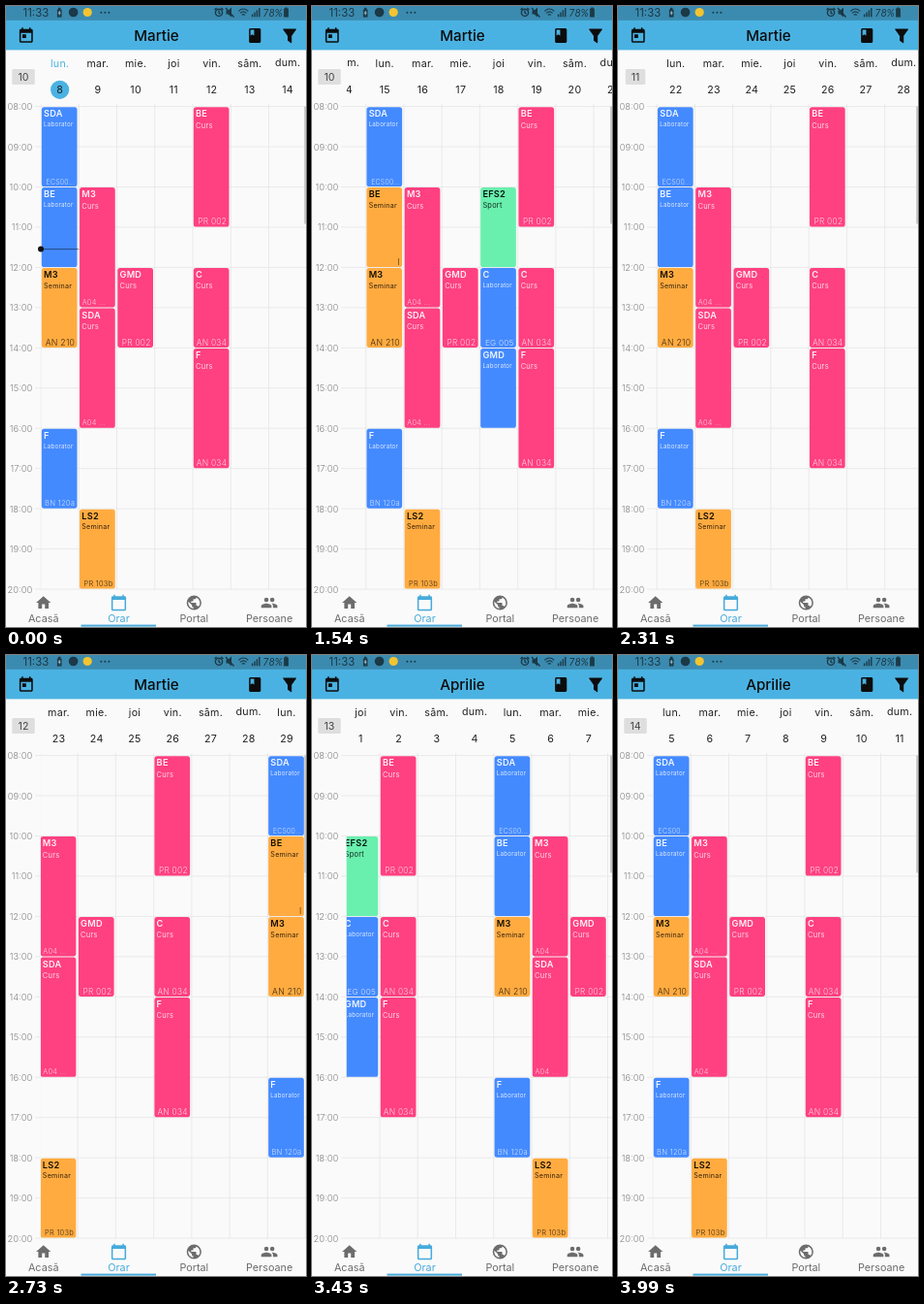
Write an HTML page that moves like this. It is 310x640 px and loops after 4.2 s.

```html
<!DOCTYPE html>
<html lang="ro">
<head>
<meta charset="utf-8">
<title>Orar</title>
<style>
  html, body { margin: 0; width: 100%; height: 100%; overflow: hidden; background: #fafafa; }
  svg { display: block; width: 100%; height: 100%; font-family: Inter, "Open Sans", sans-serif; }
  #days { letter-spacing: .25px; }
</style>
</head>
<body>
<svg id="stage" viewBox="0 0 310 640" xmlns="http://www.w3.org/2000/svg">
  <defs>
    <clipPath id="view"><rect x="35.7" y="45" width="274.3" height="556.5"/></clipPath>
  </defs>
  <rect width="310" height="640" fill="#fafafa"/>
  <g id="hours"></g>
  <g clip-path="url(#view)"><g id="days"></g></g>
  <g id="now">
    <line y1="250.6" y2="250.6" stroke="#000" stroke-opacity=".6" stroke-width=".8"/>
    <circle cy="250.6" fill="#111"/>
  </g>
  <rect x="308.2" y="103.5" width="1.8" height="121" fill="#c4c4c4"/>
  <rect id="weekBox" y="65" height="16" rx="1.5" fill="#dedede"/>
  <text id="week" x="18" y="77" font-size="10.6" fill="#444" text-anchor="middle"></text>

  <rect width="310" height="45.4" fill="#4ab2e2"/>
  <rect width="310" height="14.8" fill="#3b8bb0"/>
  <text id="month" x="155.5" y="35.8" font-size="15.2" font-weight="500" fill="#0c0c0c" text-anchor="middle"></text>
  <g id="status" fill="#1b3947">
    <text x="17.6" y="10.5" font-size="11.4">11:33</text>
    <path d="M54 1.8h2.4v1.6h1.1v8h-4.6v-8h1.1z"/>
    <path d="M55.2 5v4.4M53.8 7.2h2.8" stroke="#b9dbe8" stroke-width=".8"/>
    <circle cx="69.6" cy="6.5" r="4.8"/>
    <circle cx="84.2" cy="6.5" r="4.6" fill="#f4c430"/>
    <circle cx="98.4" cy="6.8" r="1"/><circle cx="102.4" cy="6.8" r="1"/><circle cx="106.4" cy="6.8" r="1"/>
    <path d="M227.5 4.6h2.2l3.3-3v10l-3.3-3h-2.2z"/>
    <g fill="none" stroke="#1b3947" stroke-width="1.4">
      <circle cx="220" cy="6.8" r="3.6"/>
      <path d="M220 4.5v2.6l1.6 1M215.6 4l2-2M224.4 4l-2-2M227 2l8.5 9.5"/>
      <path d="M240.3 5.3q5-4.6 10 0M242 7.4q3.3-3 6.6 0M243.8 9.3q1.5-1.3 3 0" stroke-width="1.1"/>
      <path d="M254.6 8.4v2.8M257 6.4v4.8M259.4 4.2v7M261.8 2v9.2"/>
    </g>
    <text x="265.3" y="10.6" font-size="10.8" font-style="italic" font-family="Lato, sans-serif">78%</text>
    <path d="M288.4 1.6h2.2v1h1.3v9h-4.8v-9h1.3z"/>
  </g>
  <g id="bar" fill="#0c0c0c">
    <path d="M286.8 24h12.6l-4.8 6.6v7l-3-2.3v-4.7z" stroke="#0c0c0c" stroke-width="1.2" stroke-linejoin="round"/>
  </g>
  <rect y="606" width="310" height="34" fill="#fafafa"/>
  <g id="nav" font-size="10.8" text-anchor="middle"></g>
  <rect x="77.5" y="637.6" width="77.5" height="2" fill="#46aadb"/>
</svg>
<script>
const STEP = 70, LOOP = 4200;
const LEFT = 36, DAY = 39.25, TOP = 103.6, HOUR = 41.45;
const BLUE = "#448aff", PINK = "#ff4081", ORANGE = "#ffab40", GREEN = "#69f0ae";
const NAMES = ["lun.", "mar.", "mie.", "joi", "vin.", "sâm.", "dum."];

const $ = id => document.getElementById(id);

function add(parent, tag, attrs, text) {
  const el = document.createElementNS("http://www.w3.org/2000/svg", tag);
  set(el, attrs);
  if (text) el.textContent = text;
  parent.appendChild(el);
  return el;
}

function set(el, attrs) {
  for (const key in attrs) el.setAttribute(key, attrs[key]);
}

const KINDS = {
  Laborator: { fill: BLUE, ink: "#fff", size: 6.2, dy: 20.5 },
  Curs: { fill: PINK, ink: "#fff", size: 7.5, dy: 22 },
  Seminar: { fill: ORANGE, ink: "#000", size: 7.1, dy: 21.2 },
  Sport: { fill: GREEN, ink: "#000", size: 7.4, dy: 21.5 }
};

// weekday, start hour, end hour, title, kind, room, room size, week parity (optional)
const LESSONS = [
  [0, 8, 10, "SDA", "Laborator", "ECS00...", 6.9],
  [0, 10, 12, "BE", "Laborator", "", 8, 0],
  [0, 10, 12, "BE", "Seminar", "I", 8.7, 1],
  [0, 12, 14, "M3", "Seminar", "AN 210", 8.7],
  [0, 16, 18, "F", "Laborator", "BN 120a", 7.6],
  [1, 10, 13, "M3", "Curs", "A04 ...", 7.4],
  [1, 13, 16, "SDA", "Curs", "A04 ...", 7.4],
  [1, 18, 20, "LS2", "Seminar", "PR 103b", 7.5],
  [2, 12, 14, "GMD", "Curs", "PR 002", 8.4],
  [3, 10, 12, "EFS2", "Sport", "", 8, 1],
  [3, 12, 14, "C", "Laborator", "EG 005", 8.2, 1],
  [3, 14, 16, "GMD", "Laborator", "", 8, 1],
  [4, 8, 11, "BE", "Curs", "PR 002", 8.4],
  [4, 12, 14, "C", "Curs", "AN 034", 8.4],
  [4, 14, 17, "F", "Curs", "AN 034", 8.4]
];

function addLesson(parent, x, [, from, to, title, kind, room, roomSize]) {
  const k = KINDS[kind], y = TOP + (from - 8) * HOUR, h = (to - from) * HOUR;
  add(parent, "rect", { x: x + 0.8, y: y + 0.6, width: 36.7, height: h - 1, rx: 2.6, fill: k.fill });
  add(parent, "text", { x: x + 3, y: y + 10.8, "font-size": 9.2, "font-weight": 600, fill: k.ink, "fill-opacity": 0.92 }, title);
  add(parent, "text", { x: x + 3, y: y + k.dy, "font-size": k.size, fill: k.ink, "fill-opacity": 0.82 }, kind);
  const cut = room.startsWith("A04");
  add(parent, "text", {
    x: cut ? x + 3.4 : x + 35.2, y: y + h - 2.8, "font-size": roomSize, "font-weight": 300,
    fill: k.ink, "fill-opacity": 0.75, "text-anchor": cut ? "start" : "end"
  }, room);
}

function addDay(i) {
  const x = i * DAY, mid = x + DAY / 2, wd = i % 7, week = Math.floor(i / 7);
  const lift = wd === 6 ? 0.8 : 0, today = i === 0, days = $("days");
  add(days, "line", { x1: x, x2: x, y1: 101, y2: 602, stroke: "#e6e6e6", "stroke-width": 0.8 });
  if (today) add(days, "circle", { cx: mid, cy: 86.3, r: 9.6, fill: "#4ab2e2" });
  const head = { x: mid, "text-anchor": "middle", "font-size": 10.7, fill: "#222" };
  add(days, "text", { ...head, y: 62.5 - lift, fill: today ? "#4ab2e2" : "#222" }, NAMES[wd]);
  add(days, "text", { ...head, y: 90.4 - lift }, String(i < 24 ? i + 8 : i - 23));
  for (const l of LESSONS)
    if (l[0] === wd && (l[7] === undefined || l[7] === week % 2)) addLesson(days, x, l);
}

function addIcon(parent, cx, cy, scale, d, fill) {
  add(parent, "path", { d, fill, transform: `translate(${cx} ${cy}) scale(${scale}) translate(-12 -12)` });
}

function build() {
  for (let h = 8; h <= 20; h++) {
    const y = TOP + (h - 8) * HOUR;
    add($("hours"), "line", { x1: 30, x2: 310, y1: y, y2: y, stroke: "#e6e6e6", "stroke-width": 0.8 });
    add($("hours"), "text", { x: 27.3, y: y + 3.5, "font-size": 9.4, "font-weight": 300, fill: "#858585", "text-anchor": "end" },
      String(h).padStart(2, "0") + ":00");
  }
  for (let i = 0; i < 35; i++) addDay(i);

  addIcon($("bar"), 20.8, 30.8, 0.77, "M19 3h-1V1h-2v2H8V1H6v2H5c-1.1 0-2 .9-2 2v14c0 1.1.9 2 2 2h14c1.1 0 2-.9 2-2V5c0-1.1-.9-2-2-2zm0 16H5V8h14zM7 10h5v5H7z", "#0c0c0c");
  addIcon($("bar"), 257.2, 30.5, 0.76, "M18 2H6c-1.1 0-2 .9-2 2v16c0 1.1.9 2 2 2h12c1.1 0 2-.9 2-2V4c0-1.1-.9-2-2-2zM6 4h5v8l-2.5-1.5L6 12z", "#0c0c0c");

  const tabs = [
    ["Acasă", "M10 20v-6h4v6h5v-8h3L12 3 2 12h3v8z"],
    ["Orar", "M20 3h-1V1h-2v2H7V1H5v2H4c-1.1 0-2 .9-2 2v16c0 1.1.9 2 2 2h16c1.1 0 2-.9 2-2V5c0-1.1-.9-2-2-2zm0 18H4V8h16z"],
    ["Portal", "M12 2a10 10 0 1 0 0 20 10 10 0 0 0 0-20zm-1 17.9A8 8 0 0 1 4.2 10.2L9 15v1c0 1.1.9 2 2 2zm6.9-2.5c-.3-.8-1-1.4-1.9-1.4h-1v-3c0-.6-.4-1-1-1H8v-2h2c.6 0 1-.4 1-1V7h2c1.1 0 2-.9 2-2v-.4a8 8 0 0 1 2.9 12.8z"],
    ["Persoane", "M16 11a3 3 0 1 0 0-6 3 3 0 0 0 0 6zm-8 0a3 3 0 1 0 0-6 3 3 0 0 0 0 6zm0 2c-2.3 0-7 1.2-7 3.5V19h14v-2.5c0-2.3-4.7-3.5-7-3.5zm8 0l-1 .1c1.2.8 2 1.9 2 3.4V19h6v-2.5c0-2.3-4.7-3.5-7-3.5z"]
  ];
  tabs.forEach(([label, d], i) => {
    const x = 38.7 + i * 77.8, fill = i === 1 ? "#46aadb" : "#6c6c6c";
    addIcon($("nav"), x, 615, 0.76, d, fill);
    add($("nav"), "text", { x, y: 634.6, fill }, label);
  });
}

// Each swipe moves one week: start time, steps until settled, rate, power
const SWIPES = [
  [1330, 7, 0.25, 1.7],
  [2030, 8, 0.725, 1.09],
  [2730, 8, 0.159, 2.04],
  [3360, 10, 0.198, 1.584]
];

function pageAt(ms) {
  let page = 0;
  for (const [start, steps, rate, power] of SWIPES) {
    const n = Math.floor((ms - start) / STEP) + 1;
    if (n >= steps) page += 7;
    else if (n > 0) page += 7 * (1 - Math.exp(-rate * n ** power));
  }
  return page;
}

function render(ms) {
  const page = pageAt(ms), first = Math.floor(page);
  $("days").setAttribute("transform", `translate(${LEFT - page * DAY} 0)`);

  const week = 10 + Math.floor(first / 7), w = week === 11 ? 20.5 : 23.5;
  $("week").textContent = week;
  set($("weekBox"), { x: 18 - w / 2, width: w });
  $("month").textContent = first < 24 ? "Martie" : "Aprilie";

  // The time marker shrinks as its day leaves on the left.
  const shown = Math.max(0, 1 - page), [line, dot] = $("now").children;
  $("now").setAttribute("visibility", shown > 0 ? "visible" : "hidden");
  set(line, { x1: LEFT, x2: LEFT + shown * DAY });
  set(dot, { cx: LEFT, r: 3 * shown });
}

function tick(now) {
  render(now % LOOP);
  requestAnimationFrame(tick);
}

build();
render(0);
requestAnimationFrame(tick);
</script>
</body>
</html>
```
